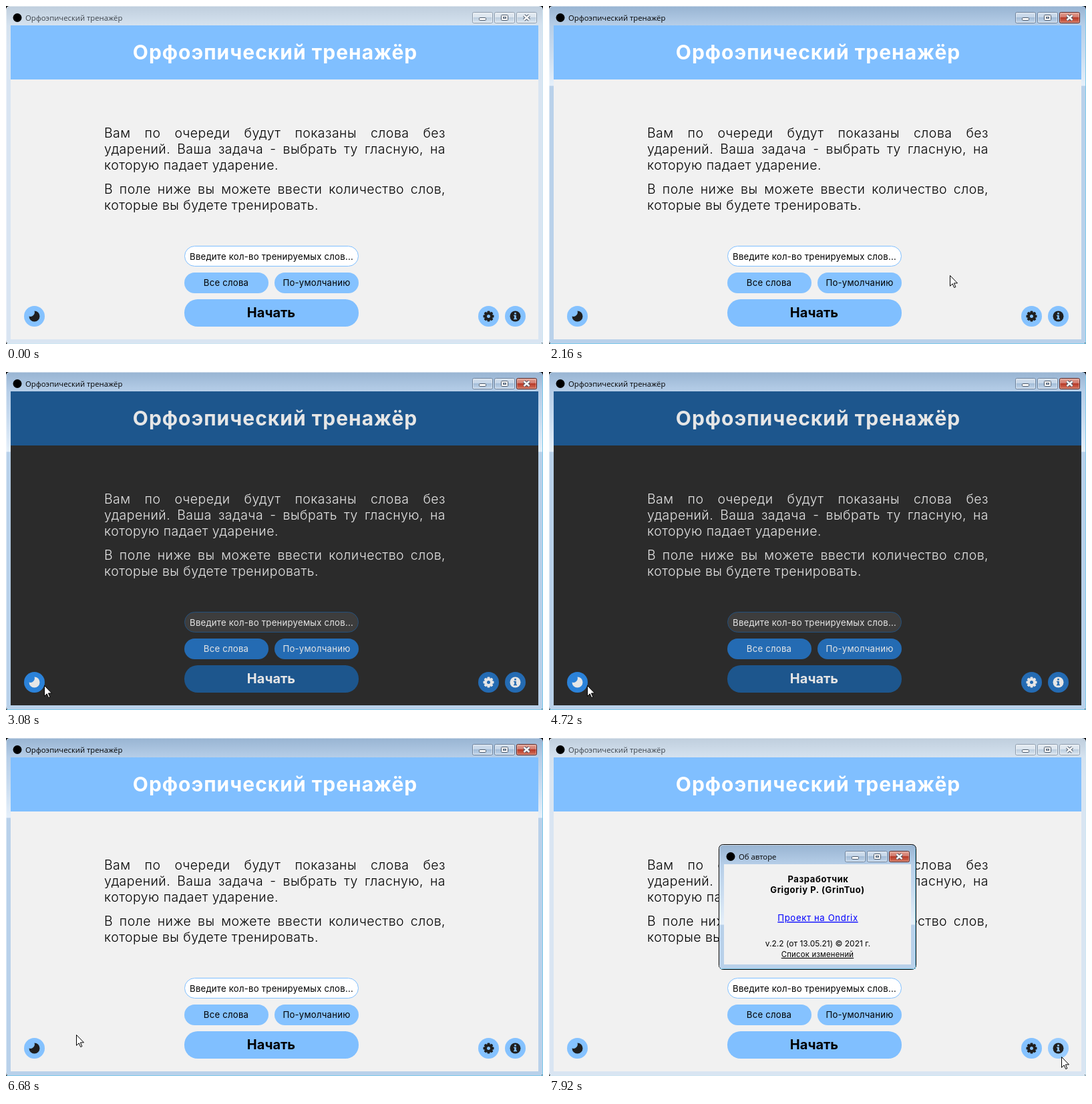
Write an HTML page that moves like this. It is 804 by 506 pixels and loops after 8000 ms.

```html
<!DOCTYPE html>
<html lang="ru">
<head>
<meta charset="utf-8">
<title>Орфоэпический тренажёр</title>
<style>
html, body { margin: 0; width: 100%; height: 100%; overflow: hidden; background: #000; }
svg {
  display: block; width: 804px; height: 506px; font-family: Inter, sans-serif;
  --bg: #f1f1f1; --main: #80bfff; --btn: #85c2ff; --hover: #99ccff; --press: #b3d9ff;
  --field: #fff; --edge: #80bfff; --text: #000; --title: #fff; --icon: #1f1f1f;
}
svg.dark {
  --bg: #2b2b2b; --main: #1d568d; --btn: #246bb3; --hover: #2b82d9; --press: #4b9be6;
  --field: #3d3d3d; --edge: #24507c; --text: #e6e6e6; --title: #e6e6e6; --icon: #e6e6e6;
}
text { fill: var(--text); white-space: pre; }
.cap { font-family: "Open Sans", sans-serif; }
.bold { font-weight: 700; }
.mid { text-anchor: middle; }
.line { text-decoration: underline; }
.head { letter-spacing: 1px; }
.body { letter-spacing: .45px; font-weight: 350; }
.ui { letter-spacing: .22px; }
.note { letter-spacing: .6px; }
.round { fill: var(--btn); }
.round.over { fill: var(--hover); }
.round.down { fill: var(--press); }
</style>
</head>
<body>
<svg id="stage" viewBox="0 0 804 506">
  <defs>
    <linearGradient id="close" x2="0" y2="1">
      <stop stop-color="#e5a697"/><stop offset=".48" stop-color="#d0766a"/>
      <stop offset=".5" stop-color="#b83a28"/><stop offset="1" stop-color="#d3735c"/>
    </linearGradient>
    <linearGradient id="glass" x2="0" y2="1">
      <stop stop-color="#fff" stop-opacity=".55"/><stop offset=".48" stop-color="#fff" stop-opacity=".3"/>
      <stop offset=".5" stop-color="#8fa9c4" stop-opacity=".25"/><stop offset="1" stop-color="#fff" stop-opacity=".25"/>
    </linearGradient>
  </defs>
</svg>
<script>
const LOOP = 8000, STEP = 40;
const stage = document.getElementById('stage');

function add(tag, attrs = {}, parent = stage, content) {
  const el = document.createElementNS('http://www.w3.org/2000/svg', tag);
  for (const key in attrs) el.setAttribute(key, attrs[key]);
  if (content) el.textContent = content;
  parent.append(el);
  return el;
}
const box = (x, y, width, height, fill, rx = 0, parent = stage, more = {}) =>
  add('rect', { x, y, width, height, fill, rx, ...more }, parent);
const label = (x, y, size, content, cls = '', parent = stage, style = '') =>
  add('text', { x, y, 'font-size': size, class: cls, style }, parent, content);

// Window chrome
function shades(id, stops, h) {
  const g = add('linearGradient', { id, gradientUnits: 'userSpaceOnUse', x1: 0, x2: 0, y1: 0, y2: h }, stage.querySelector('defs'));
  for (const [y, color] of stops) add('stop', { offset: y / h, 'stop-color': color }, g);
}
shades('active', [[0, '#98b4d2'], [29, '#b6cee8'], [70, '#c9dcf0'], [119, '#e6f0fa'], [120, '#b9d1ea'], [121, '#b9d1ea']], 121);
shades('idle', [[0, '#bfcedd'], [29, '#d5e2ef'], [60, '#d9e5f2']], 60);

function captionButton(g, x, on, kind) {
  const red = on && kind === 2;
  box(x + .5, 9.5, 30, 16, red ? 'url(#close)' : 'url(#glass)', 2, g,
    { stroke: red ? '#5c1f1a' : on ? '#6c819b' : '#8c9bac' });
  box(x + 1.5, 10.5, 28, 14, 'none', 1, g, { stroke: '#fff', 'stroke-opacity': red ? .35 : .5 });
  const ink = { stroke: '#4d5a6b', 'stroke-width': 1 };
  if (kind === 0) box(x + 10.5, 17.5, 10, 4, '#fff', 1, g, ink);
  if (kind === 1) {
    box(x + 10.5, 13.5, 10, 8, '#fff', 1, g, ink);
    box(x + 13.5, 16.5, 4, 2, on ? '#b9cde3' : '#d0dde9', 0, g, ink);
  }
  if (kind === 2) {
    const d = `M${x + 11.5} 14L${x + 19.5} 21M${x + 19.5} 14L${x + 11.5} 21`;
    add('path', { d, stroke: '#4d5a6b', 'stroke-width': 4.4 }, g);
    add('path', { d, stroke: '#fff', 'stroke-width': 2.4 }, g);
  }
}
function chrome(parent, w, h, name, on) {
  const g = add('g', {}, parent);
  box(-.5, -.5, w + 1, h + 1, `url(#${on ? 'active' : 'idle'})`, 6, g, { stroke: '#000' });
  add('path', { d: `M.5 ${h - 1}V6Q.5 .5 6 .5H${w - 6}`, fill: 'none', stroke: '#fff', 'stroke-opacity': .55 }, g);
  add('path', { d: `M${w - .5} 6V${h - .5}H1`, fill: 'none', stroke: on ? '#7fcbea' : '#cfe6f2' }, g);
  add('circle', { cx: 17, cy: 17.5, r: 6.5, fill: '#000' }, g);
  label(29, 22, 11.3, name, 'cap', g, `fill:${on ? '#000' : '#3c434b'}`);
  [698, 731, 764].forEach((x, kind) => captionButton(g, x - 804 + w, on, kind));
  return g;
}

const NAME = 'Орфоэпический тренажёр';
chrome(stage, 804, 506, NAME, false);
const lit = chrome(stage, 804, 506, NAME, true);

// Page
box(7, 29, 790, 470, 'var(--bg)');
box(7, 29, 790, 81, 'var(--main)');
label(403, 80, 30, NAME, 'bold mid head', stage, 'fill:var(--title)');

function justify(el, width) {
  const gaps = el.textContent.split(' ').length - 1;
  el.style.wordSpacing = (width - el.getComputedTextLength()) / gaps + 'px';
}
const BODY = [
  [197, 'Вам по очереди будут показаны слова без', 1],
  [221, 'ударений. Ваша задача - выбрать ту гласную, на', 1],
  [245, 'которую падает ударение.'],
  [281, 'В поле ниже вы можете ввести количество слов,', 1],
  [305, 'которые вы будете тренировать.'],
];
for (const [y, content, full] of BODY) {
  const el = label(147, y, 19.5, content, 'body');
  if (full) justify(el, 511);
}

box(267.5, 359.5, 260, 30, 'var(--field)', 15, stage, { stroke: 'var(--edge)' });
label(397.5, 380, 13.2, 'Введите кол-во тренируемых слов...', 'mid ui');
box(267, 399, 126, 31, 'var(--btn)', 15.5);
label(329.5, 419, 13.2, 'Все слова', 'mid ui');
box(402, 399, 126, 31, 'var(--btn)', 15.5);
label(465, 419, 13.2, 'По-умолчанию', 'mid ui');
box(267, 439, 261, 41, 'var(--main)', 20);
label(397, 466, 20, 'Начать', 'bold mid');

// Round buttons
const ROUND_Y = 464.5;
const [moon, gear, info] = [42.5, 722.5, 762.5].map(x => {
  const el = add('circle', { cx: x, cy: ROUND_Y, r: 15.5, class: 'round' });
  return { x, el, icon: add('g', { transform: `translate(${x} ${ROUND_Y})`, fill: 'var(--icon)' }) };
});
add('path', { d: 'M0-8A8 8 0 1 1-8 0A6.3 6.3 0 0 0 0-8Z' }, moon.icon);
for (let a = 0; a < 360; a += 45) box(-2, -8, 4, 5, 'var(--icon)', 1, gear.icon, { transform: `rotate(${a})` });
add('circle', { r: 4.4, fill: 'none', stroke: 'var(--icon)', 'stroke-width': 3.8 }, gear.icon);
add('circle', { r: 8 }, info.icon);
add('path', { d: 'M-1.3-5.4H1.3V-3H-1.3ZM-2.4-1.8H1.3V3.2H2.5V4.8H-2.5V3.2H-1.3V-.3H-2.4Z', class: 'round' }, info.icon);

// About window
const about = add('g', { transform: 'translate(255 160)' });
chrome(about, 294, 186, 'Об авторе', true);
box(7, 29, 280, 150, 'var(--bg)', 0, about);
label(148, 56, 13, 'Разработчик', 'bold mid note', about);
label(147, 72, 13, 'Grigoriy P. (GrinTuo)', 'bold mid note', about);
label(147.5, 114, 13.2, 'Проект на Ondrix', 'mid line note', about, 'fill:#00f');
label(147.5, 152, 12, 'v.2.2 (от 13.05.21) © 2021 г.', 'mid', about);
label(147, 168, 11.3, 'Список изменений', 'mid line ui', about);

const cursor = add('path', {
  d: 'M.5.5V16.3L4.2 12.8L6.7 18.5L8.9 17.6L6.4 11.9H11.5Z',
  fill: '#fff', stroke: '#000', 'stroke-width': 1,
});

// Pointer strokes: start, end, from, bend, to
const MOVES = [
  [880, 1040, [650, 495], [638, 462], [634, 442]],
  [1680, 1680, [635, 441], [635, 441], [635, 441]],
  [2160, 2640, [600, 403], [330, 257], [57, 469]],
  [6680, 7000, [105, 444], [500, 173], [743, 330]],
  [7240, 7400, [746, 350], [758, 420], [768, 479]],
  [7920, 7920, [767, 477], [767, 477], [767, 477]],
];
const clamp = v => Math.max(0, Math.min(1, v));
function pointer(t) {
  const move = MOVES.filter(m => m[0] <= t).pop();
  if (!move) return null;
  const [start, end, a, b, c] = move;
  const p = end > start ? clamp((t - start) / (end - start)) : 1;
  const u = p * p * (3 - 2 * p), v = 1 - u;
  return a.map((n, i) => Math.round(v * v * n + 2 * u * v * b[i] + u * u * c[i]));
}
const within = (t, a, b) => t >= a && t < b;

function render(ms) {
  const t = Math.floor(ms / STEP) * STEP;
  stage.classList.toggle('dark', within(t, 3080, 4760));

  const opened = clamp((t - 7520) / 160);
  lit.setAttribute('opacity', clamp((t - 1400) / 80) * (1 - opened));
  about.setAttribute('opacity', opened);
  about.setAttribute('display', opened ? 'inline' : 'none');

  const at = pointer(t);
  cursor.setAttribute('display', at ? 'inline' : 'none');
  if (at) cursor.setAttribute('transform', `translate(${at})`);

  const pressed = within(t, 2960, 3080) || within(t, 4640, 4720) || within(t, 7440, 7520);
  for (const { x, el, icon } of [moon, gear, info]) {
    const over = !!at && Math.hypot(at[0] - x, at[1] - ROUND_Y) < 16;
    for (const part of [el, ...icon.querySelectorAll('.round')]) {
      part.classList.toggle('over', over);
      part.classList.toggle('down', over && pressed);
    }
  }
}

const begin = performance.now();
(function tick() {
  render((performance.now() - begin) % LOOP);
  requestAnimationFrame(tick);
})();
</script>
</body>
</html>
```
